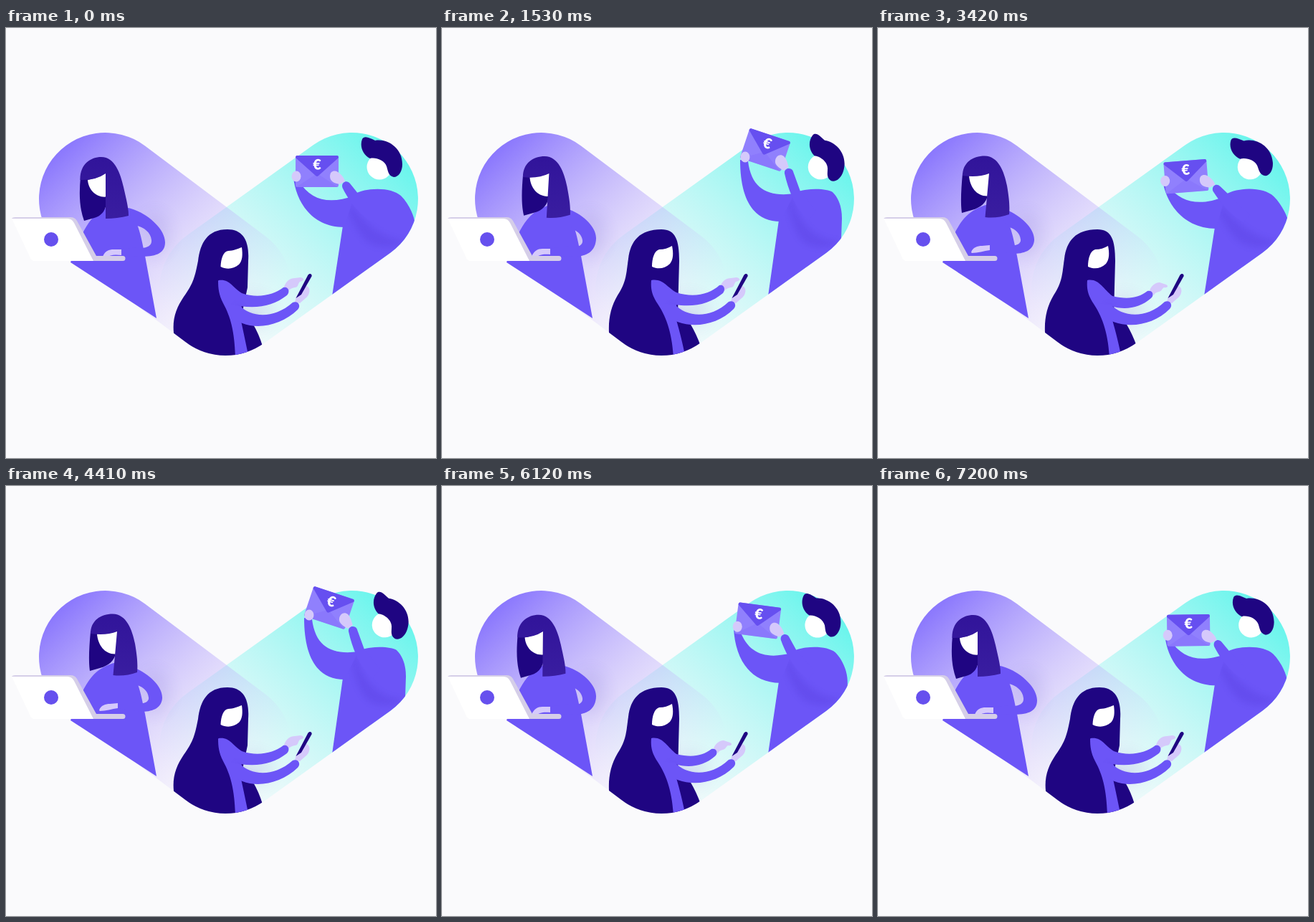
An HTML page for the animation above (7230 ms loop, 600x600 px).

```html
<!DOCTYPE html>
<html lang="en">
<head>
<meta charset="utf-8">
<title>People in a heart</title>
<style>
  html, body { margin: 0; width: 100%; height: 100%; overflow: hidden; background: #fafafc; }
  svg { display: block; width: 100vw; height: 100vh; }
  .body { fill: #6c55f7; }
  .dark { fill: #1f0582; }
  .skin { fill: #d5c9fb; }
  .shade { fill: #4a33cf; opacity: .2; filter: url(#soft); }
  .glow { fill: #5a48b8; opacity: .1; filter: url(#blur); }
  .euro { font: 900 20px Lato, "Open Sans", sans-serif; fill: #fff; text-anchor: middle; }
</style>
</head>
<body>
<svg viewBox="0 0 600 600">
  <defs>
    <linearGradient id="violet" gradientUnits="userSpaceOnUse" x1="70" y1="180" x2="300" y2="430">
      <stop offset="0" stop-color="#8c79fd"/>
      <stop offset="1" stop-color="#d6c6fa" stop-opacity="0"/>
    </linearGradient>
    <linearGradient id="mint" gradientUnits="userSpaceOnUse" x1="555" y1="175" x2="290" y2="455">
      <stop offset="0" stop-color="#65f5ec"/>
      <stop offset="1" stop-color="#b2f5f3" stop-opacity="0"/>
    </linearGradient>
    <linearGradient id="fringe" x1="0" y1="0" x2="0" y2="1">
      <stop offset="0" stop-color="#31149a"/>
      <stop offset="1" stop-color="#391da0"/>
    </linearGradient>
    <filter id="soft" x="-30%" y="-30%" width="160%" height="160%"><feGaussianBlur stdDeviation="4"/></filter>
    <filter id="blur" x="-60%" y="-60%" width="220%" height="220%"><feGaussianBlur stdDeviation="10"/></filter>
    <path id="leftPill" d="M194 164.500 L362 290.500 A92 92 0 0 1 251 438.500 L83 312.500 A92 92 0 0 1 194 164.500Z"/>
    <path id="rightPill" d="M428.700 163.300 L252.700 289.300 A92 92 0 0 0 360.300 439.700 L536.300 313.700 A92 92 0 0 0 428.700 163.300Z"/>
    <clipPath id="inRight"><use href="#rightPill"/></clipPath>
    <clipPath id="inHeart"><use href="#leftPill"/><use href="#rightPill"/></clipPath>
  </defs>

  <use href="#rightPill" fill="url(#mint)"/>
  <use href="#leftPill" fill="url(#violet)"/>

  <!-- woman with laptop -->
  <g clip-path="url(#inHeart)"><ellipse class="glow" cx="208" cy="288" rx="22" ry="32"/></g>
  <path class="body" d="M150 247 L165 249 C185 265 188 290 194 318 L210 405 L90 327 L104 292 C113 275 121 256 150 247Z"/>
  <path class="body" id="typeArm"/>
  <path class="dark" id="bob"/>
  <path fill="#fff" id="profile"/>
  <path fill="url(#fringe)" id="bangs"/>
  <path class="skin" id="typeHand"/>
  <path fill="#d5cee8" d="M8 266 Q9 264 13 264 L90 264 Q96 264 99 269 L126 318 L163 318 A3.500 3.500 0 0 1 163 325 L118 325 L88 267Z"/>
  <path fill="#fff" d="M8 266 L86 266 Q92 266 95 272 L122 325 L39 325 Q36 325 34 321Z"/>
  <circle cx="63" cy="295" r="10" fill="#6650ee"/>

  <!-- man with envelope -->
  <g clip-path="url(#inRight)">
    <path class="body" id="manBody"/>
    <path class="shade" id="manShade"/>
  </g>
  <path class="body" id="manArm"/>
  <path class="body" id="manFore"/>
  <g id="letter">
    <rect x="-30" y="-22" width="60" height="44" rx="2.500" fill="#9080fd"/>
    <path fill="#7e69fa" d="M-29 22 L0 3 L29 22Z" opacity=".35"/>
    <path fill="#664ff0" d="M-28 -22 H28 Q30 -22 30 -19 L2 6 Q0 8 -2 6 L-30 -19 Q-30 -22 -28 -22Z"/>
    <text class="euro" x="0" y="-2.500">€</text>
  </g>
  <ellipse class="skin" id="manThumb" rx="6.500" ry="7.500"/>
  <path class="skin" id="manHand"/>
  <g id="manHead">
    <circle cx="521" cy="194" r="17.500" fill="#fff"/>
    <path class="dark" d="M497 155 C500 149 508 154 515 157 C532 154 553 167 553 190 C553 200 548 208 541 208 C533 206 533 199 531 193 C528 184 515 180 508 182 C498 177 493 165 497 155Z"/>
  </g>

  <!-- woman with phone -->
  <g clip-path="url(#inHeart)">
    <ellipse class="glow" cx="345" cy="395" rx="28" ry="24"/>
    <path class="dark" id="hair"/>
    <path class="body" id="torso"/>
  </g>
  <path fill="#fff" id="face"/>
  <path class="skin" id="tapHand"/>
  <path class="body" id="farArm"/>
  <path class="shade" id="fold"/>
  <path class="skin" d="M403 383 C404 374 410 367 419 360 C426 362 424 373 418 377 L410 384Z"/>
  <path class="dark" d="M421.500 344.500 C423.500 341.500 427.500 343 426.500 346.500 L412 372 L404.500 377Z"/>
  <path class="body" id="nearArm"/>
</svg>
<script>
const LOOP = 7230;
const $ = id => document.getElementById(id);

// Blends two paths that share the same commands.
function mix(a, b, u) {
  const to = b.match(/-?[\d.]+/g);
  let i = 0;
  return a.replace(/-?[\d.]+/g, n => (+n + (to[i++] - n) * u).toFixed(2));
}

// Rows are [time, value]; the value eases between rows.
function track(rows, t) {
  let i = rows.length - 1;
  while (i > 0 && rows[i][0] > t) i--;
  const [t0, a] = rows[i];
  if (!rows[i + 1]) return a;
  const [t1, b] = rows[i + 1];
  return a + (b - a) * (1 - Math.cos(Math.PI * (t - t0) / (t1 - t0))) / 2;
}

const keys = {
  turn: [[0, 0], [760, 0], [1530, .65], [2520, 1], [4500, 1], [5200, .06], [5700, -.05], [6120, .12], [6750, 0]],
  typing: [[0, 0], [600, 1], [2900, 1], [3250, 2], [3500, 2], [3750, 1], [4000, 1], [4350, 2],
    [4480, 2], [4900, 1], [6750, 1], [7180, 0]],
  lean: [[0, 0], [700, 1], [3430, 1], [4250, 0], [4530, 0], [5230, 1], [6130, 1], [6740, 0]],
  away: [[0, 0], [2700, 0], [3300, 1], [3500, 1], [4000, 0], [5400, 0], [6000, 1], [6200, 1], [6800, 0]],
  // starts at the moment the letter is lowest
  lift: [[0, 0], [1100, 1], [2435, 1], [3335, 0]]
};

// typing poses: right, left, raised
const typeArm = [
  "M160 250 C185 249 222 276 222 299 C222 316 206 319 188 319 L160 318 L160 309 L180 306 C196 309 204 304 203 296 C202 285 192 278 183 276Z",
  "M160 250 C182 249 215 272 215 293 C215 312 201 319 185 319 L150 318 L150 308 L175 304 C190 308 197 303 196 296 C195 289 190 284 183 281Z",
  "M160 250 C183 249 219 274 218 296 C217 311 203 315 188 315 L155 310 L155 302 L178 302 C193 306 200 301 199 295 C198 286 191 280 183 278Z"
];
const typeHand = [
  "M135 319 C138 311 144 309 150 309 L161 309 L161 317 C152 316 145 316 140 321Z",
  "M125 319 C128 311 134 308 140 308 L151 308 L151 316 C142 315 135 316 130 321Z",
  "M130 313 C132 306 139 304 145 304 L156 303 L156 310 C148 311 139 314 131 314Z"
];

// head turned to the screen and away from it
const head = {
  bob: ["M104 208 C102 230 102 250 109 269 L123 265 C135 262 140 252 141 240 L139 200Z",
    "M118 203 C116 225 115 245 117 258 L131 254 C143 251 152 243 153 233 L155 195Z"],
  profile: ["M114 212 Q129 209 140 202 L140 235.500 C126 237 115 226 114 212Z",
    "M127 206 Q142 206 156 202 L153 234.500 C138 235 128 222 127 206Z"],
  bangs: ["M103.500 212 C103 190 118 180 133 180 C152 180 160 204 164 222 C168 240 171 250 171 262 Q155 266 139 266 L139 203 Q125 213 103.500 212Z",
    "M118 206 C118 188 132 178.500 149 178.500 C168 179 176 200 180 220 C183 238 184 248 183 260 Q166 266 149.500 264 L155 203 Q140 209 118 206Z"]
};

// low and raised poses
const man = {
  manBody: ["M478 238 C492 222 536 220 551 234 C562 245 570 262 571 275 L572 292 L560 330 L440 400 L455 374 L470 276Z",
    "M483 236 C497 222 536 223 545 229 C554 238 558 250 558 266 L557 296 L556 330 L440 400 L455 374 L470 268Z"],
  manShade: ["M482 246 C498 272 530 298 556 296 C545 309 520 308 504 298 C490 285 482 268 476 252Z",
    "M488 236 C496 270 520 298 556 298 C540 309 518 308 504 298 C492 285 485 262 482 242Z"],
  manArm: ["M401 208 C404 240 425 278 472 278 L486 234 C450 247 425 240 409 214Z",
    "M416 184 C416 240 435 270 472 270 L492 231 C455 236 432 225 427 186Z"],
  manFore: ["M469.500 223 C467 216 475 211 480 217 L492 232 L520 260 L510 270 C495 262 480 244 469.500 223Z",
    "M478 203 C477 195 487 194 489.500 199 L500 228 L522 255 L512 268 C500 260 486 238 478 203Z"],
  manHand: ["M452 207 C452 200 458 198 463 201 C469 205 472 210 473 214 L466 218 C458 217 452 214 452 207Z",
    "M465 185 C466 178 472 175 477 179 C482 184 482 190 484 194 L477 199 C470 195 464 191 465 185Z"]
};

// upright and leaning poses
const phone = {
  hair: ["M309 281 C330 281 340 296 338 325 L337 362 L329 400 L344 412 Q353 427 358 444 L340 470 L234 470 L234 425 C232 405 238 390 248 375 C262 356 264 345 268 325 C271 300 281 281 309 281Z",
    "M306 281 C326 281 331 296 331 325 L330 362 L329 400 L346 412 Q355 427 361 444 L340 470 L234 470 L233 425 C232 405 236 388 245 373 C258 353 257 342 260 322 C263 297 276 281 306 281Z"],
  torso: ["M296 352 C296 364 297 372 303 384 C314 404 319 425 320 460 L338 456 C333 432 330 418 327 404 L330 375Z",
    "M292 352 C291 364 293 372 299 382 C313 402 321 425 323 460 L339 456 C334 432 330 418 326 404 L328 375Z"],
  face: ["M329 306 C330.500 316 330 325 325 330 C317 337 307 337 299.500 333 C300 322 303 312 310 311 C317 311 323 308 329 306Z",
    "M321 304 C323 314 323 323 318 329 C311 336 301 337 293 333 C293 322 296 311 303 309 C310 309 316 307 321 304Z"],
  farArm: ["M297 352 C312 350 316 362 329 370 C352 378 374 372 387 362 C394 360 397 368 392 373 C374 387 352 392 327 388 L312 398 C301 380 297 366 297 352Z",
    "M292 352 C308 349 314 362 327 369 C352 377 374 371 387 359 C394 357 396 365 392 370 C374 385 352 390 325 386 L310 396 C297 380 292 366 292 352Z"],
  nearArm: ["M310 386 L327 388 C340 402 372 408 400 383 C408 380 412 388 407 393 C380 419 335 425 312 400Z",
    "M305 384 L325 386 C340 402 372 408 400 382 C408 379 412 387 407 392 C380 419 335 422 309 398Z"],
  fold: ["M324 386 C336 400 350 403 362 401 L345 406 C332 404 324 396 320 388Z",
    "M322 385 C335 400 350 403 362 401 L345 406 C330 404 322 396 317 387Z"]
};
const farArmAway = "M292 352 C308 349 314 364 327 374 C348 379 363 377 376 367 C383 365 386 373 381 377 C365 391 345 394 325 388 L310 396 C297 380 292 366 292 352Z";
const tapNear = "M388 361 C391 353 396 349 403 349 L411 348 C417 349 416 353 410 354 C407 357 408 362 403 362 C399 363 396 364 394 367Z";
const tapAway = "M379 366 C382 359 387 355 393 355 L402 358 C406 360 404 363 399 362 C396 364 396 367 392 368 C388 369 386 370 385 373Z";

const setPath = (id, d) => $(id).setAttribute("d", d);
const setMove = (id, value) => $(id).setAttribute("transform", value);
const pose3 = (p, v) => v < 1 ? mix(p[0], p[1], v) : mix(p[1], p[2], v - 1);

function setPose(parts, u) {
  for (const id in parts) setPath(id, mix(...parts[id], u));
}

function draw(t) {
  setPose(head, track(keys.turn, t));
  const typing = track(keys.typing, t);
  setPath("typeArm", pose3(typeArm, typing));
  setPath("typeHand", pose3(typeHand, typing));

  const half = LOOP / 2;
  const lift = track(keys.lift, (t + half - 3260) % half);
  const u = (lift - .235) / .765;
  setPose(man, u);
  setMove("letter", `translate(${434 + 17 * u} ${200 - 30 * u}) rotate(${18.5 * u})`);
  setMove("manThumb", `translate(${405 + 18 * u} ${207 - 27 * u})`);
  setMove("manHead", `translate(${11.5 * u} 0) rotate(${18 * u} 519.5 180.5)`);

  const lean = track(keys.lean, t), away = track(keys.away, t);
  setPose(phone, lean);
  setPath("farArm", mix(mix(...phone.farArm, lean), farArmAway, away));
  setPath("tapHand", mix(tapNear, tapAway, away));
}

const start = performance.now();
function tick() {
  draw((performance.now() - start) % LOOP);
  requestAnimationFrame(tick);
}
tick();
</script>
</body>
</html>
```
